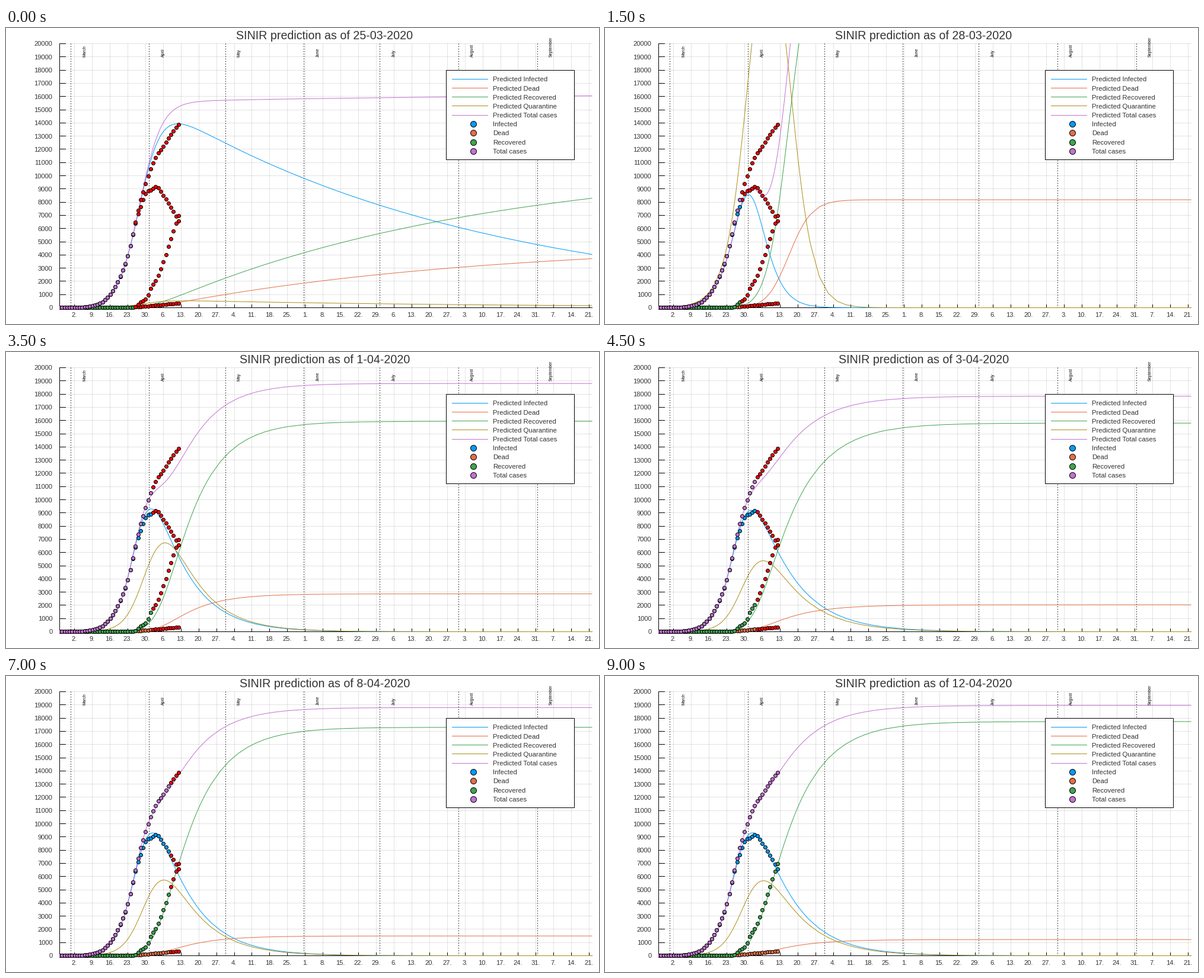
Animation, 1000 px wide and 500 px high, one loop 9500 ms. Source, as a matplotlib script:

```python
import numpy as np
import matplotlib.pyplot as plt
from matplotlib.animation import FuncAnimation
from matplotlib.patches import Rectangle

plt.rcParams["font.family"] = "Liberation Sans"

PX = 0.72  # points per pixel at 100 dpi
LEFT, RIGHT, TOP, BASE = 90, 988, 26.5, 472.5
BLUE, ORANGE, GREEN = "#009afa", "#e36f47", "#3ea44e"
OLIVE, PURPLE, RED = "#ac8e18", "#c371d2", "#ff0000"
INK = "#333333"
FRAMES = 19
LAST_DAY = 210


def px(day):
    return LEFT + np.asarray(day) * (RIGHT - LEFT) / LAST_DAY


def py(value):
    return BASE - np.asarray(value) * (BASE - TOP) / 20000


def log_curve(points, t):
    """Cubic Hermite curve in log space through {day: value}."""
    x = np.array(list(points), float)
    y = np.log(list(points.values()))
    m = np.gradient(y, x)
    i = np.clip(np.searchsorted(x, t, side="right") - 1, 0, len(x) - 2)
    h = x[i + 1] - x[i]
    u = (t - x[i]) / h
    return np.exp((1 + 2 * u) * (1 - u) ** 2 * y[i] + u * (1 - u) ** 2 * h * m[i]
                  + u * u * (3 - 2 * u) * y[i + 1] + u * u * (u - 1) * h * m[i + 1])


# Reported cases, day 0 is 25 February
report_days = np.arange(48)
total = log_curve({0: 2, 5: 14, 10: 55, 15: 246, 20: 1018, 24: 2388, 27: 3924,
                   29: 5588, 31: 7399, 34: 9377, 38: 11383, 41: 12206,
                   44: 13138, 47: 13892}, report_days)
dead = log_curve({0: 0.3, 16: 1, 24: 6, 30: 49, 35: 128, 40: 220, 47: 350},
                 report_days)
recovered = log_curve({0: 0.5, 22: 9, 29: 9, 31: 225, 34: 636, 36: 1436,
                       38: 2022, 41: 3463, 44: 5240, 47: 6987}, report_days)
reports = [(total - dead - recovered, BLUE), (dead, ORANGE),
           (recovered, GREEN), (total, PURPLE)]

# Model settings by step: outbreak size, deaths per recovery, growth, midpoint,
# isolation rate, discharge rate, day of half discharge rate
SETTINGS = {
    0: (16205, 0.448, 0.230, 31.7, 0.0078, 0.210, 30.0),
    3: (36870, 0.285, 0.204, 33.9, 0.2400, 0.240, 51.7),
    5: (19770, 0.231, 0.273, 30.4, 0.0840, 0.136, 41.0),
    9: (17840, 0.129, 0.265, 30.5, 0.0680, 0.153, 37.5),
    12: (18460, 0.097, 0.262, 30.6, 0.0710, 0.156, 37.5),
    16: (19140, 0.076, 0.254, 30.9, 0.0745, 0.159, 37.5),
    18: (18960, 0.069, 0.250, 30.95, 0.0715, 0.155, 37.5)}

DT = 0.05
grid = np.arange(0, LAST_DAY + DT, DT)
days = np.r_[np.arange(0, 60, 0.5), np.arange(60, 90, 3.5),
             np.arange(90, LAST_DAY + 1, 7.5)]


def forecast(n):
    """Flow from infected to quarantine to recovered or dead."""
    size, deaths, growth, mid, isolate, discharge, half = (
        np.interp(n, list(SETTINGS), column) for column in zip(*SETTINGS.values()))
    bend = 1 + 8 * isolate ** 2
    caught = size * (1 + np.exp(-growth * bend * (grid - mid))) ** (-1 / bend)
    new = np.diff(caught, append=caught[-1])
    release = discharge / (1 + np.exp((half - grid) / 5))

    infected, quarantine, done = caught[0], 0.0, 0.0
    states = []
    for fresh, rate in zip(new, release):
        states.append((infected, quarantine, done))
        moved, freed = isolate * infected * DT, rate * quarantine * DT
        infected += fresh - moved
        quarantine += moved - freed
        done += freed
    inf, quar, done = (np.interp(days, grid, s) for s in zip(*states))
    rec = done / (1 + deaths)
    return inf, deaths * rec, rec, quar, inf + done


forecasts = [forecast(n) for n in range(FRAMES)]

fig = plt.figure(figsize=(10, 5), dpi=100, facecolor="white")
ax = fig.add_axes([0, 0, 1, 1])
ax.set(xlim=(0, 1000), ylim=(500, 0))
ax.axis("off")
clip = Rectangle((89.5, 26), 899.5, 448.5, transform=ax.transData)


def line(x, y, color="black", z=1, **kw):
    return ax.plot(x, y, color=color, lw=PX, zorder=z, **kw)[0]


def rule(x, y, color="black", z=2, **kw):
    """Straight line on whole pixels; snapping would round it up."""
    return line(np.subtract(x, 0.5), np.subtract(y, 0.5), color, z, **kw)


def label(x, y, text, size=11.1, color=INK, **kw):
    return ax.text(x, y, text, fontsize=size * PX, color=color, zorder=6,
                   va="baseline", **kw)


def dots(color, size, z, x=(), y=()):
    return ax.plot(x, y, "o", ms=size * PX, mfc=color, mec="black", mew=PX,
                   zorder=z)[0]


# Grid, axes and ticks
for v in range(0, 20001, 1000):
    y = py(v)
    rule([LEFT, RIGHT], [y, y], z=1, alpha=0.11)
    rule([LEFT, LEFT + 10.8], [y, y])
    label(78.3, y + 4, str(v), ha="right")

months = {"March": 31, "April": 30, "May": 31, "June": 30, "July": 31,
          "August": 31, "September": 30}
dates = [d for n in months.values() for d in range(1, n + 1)]
for d in range(6, LAST_DAY, 7):
    x = px(d)
    rule([x, x], [TOP, BASE], z=1, alpha=0.11)
    rule([x, x], [BASE, BASE - 5.4])
    label(x - 0.5, 488, f"{dates[d - 5]}.", ha="center")
rule([LEFT, LEFT], [TOP, BASE])
rule([LEFT, RIGHT], [BASE, BASE])

start = 4.5
for month, length in months.items():
    x = px(start)
    rule([x, x], [TOP, BASE], ls=(0, (1.4, 2.8)))
    label(x + 24.7, 48.8, month, 7, "black", rotation=90,
          rotation_mode="anchor")
    start += length

# Legend
names = ["Infected", "Dead", "Recovered", "Quarantine", "Total cases"]
hues = [BLUE, ORANGE, GREEN, OLIVE, PURPLE]
ax.add_patch(Rectangle((742, 71), 216, 151, fc="white", ec="black",
                       lw=PX, zorder=5))
rows = [("Predicted " + n, c, True) for n, c in zip(names, hues)]
rows += [(n, c, False) for n, c in zip(names, hues) if n != "Quarantine"]
for i, (name, color, is_line) in enumerate(rows):
    y = 86.5 + 15.15 * i
    if is_line:
        rule([752, 812], [y, y], color, 6)
    else:
        dots(color, 10, 6, [787.5], [y])
    label(821.2, y + 4, name, 11.4)

# Moving parts
title = label(537.5, 19.3, "", 19.6, ha="center")
lines = [line([], [], c, 3) for c in hues]
known = [dots(c, 6, 4 + i / 10) for i, (_, c) in enumerate(reports)]
future = [dots(RED, 6, 4 + i / 10) for i in range(len(reports))]
for artist in lines + known + future:
    artist.set_clip_path(clip)


def draw(n):
    d = 25 + n
    date = f"{d}-03" if d <= 31 else f"{d - 31}-04"
    title.set_text(f"SINIR prediction as of {date}-2020")
    for ln, values in zip(lines, forecasts[n]):
        ln.set_data(px(days), py(values))
    cut = 30 + n
    x = px(report_days)
    for (values, _), past, ahead in zip(reports, known, future):
        y = py(values)
        past.set_data(x[:cut], y[:cut])
        ahead.set_data(x[cut:], y[cut:])
    return [title, *lines, *known, *future]


anim = FuncAnimation(fig, draw, frames=FRAMES, interval=500, repeat=True,
                     repeat_delay=0, init_func=lambda: draw(0))
plt.show()
```
